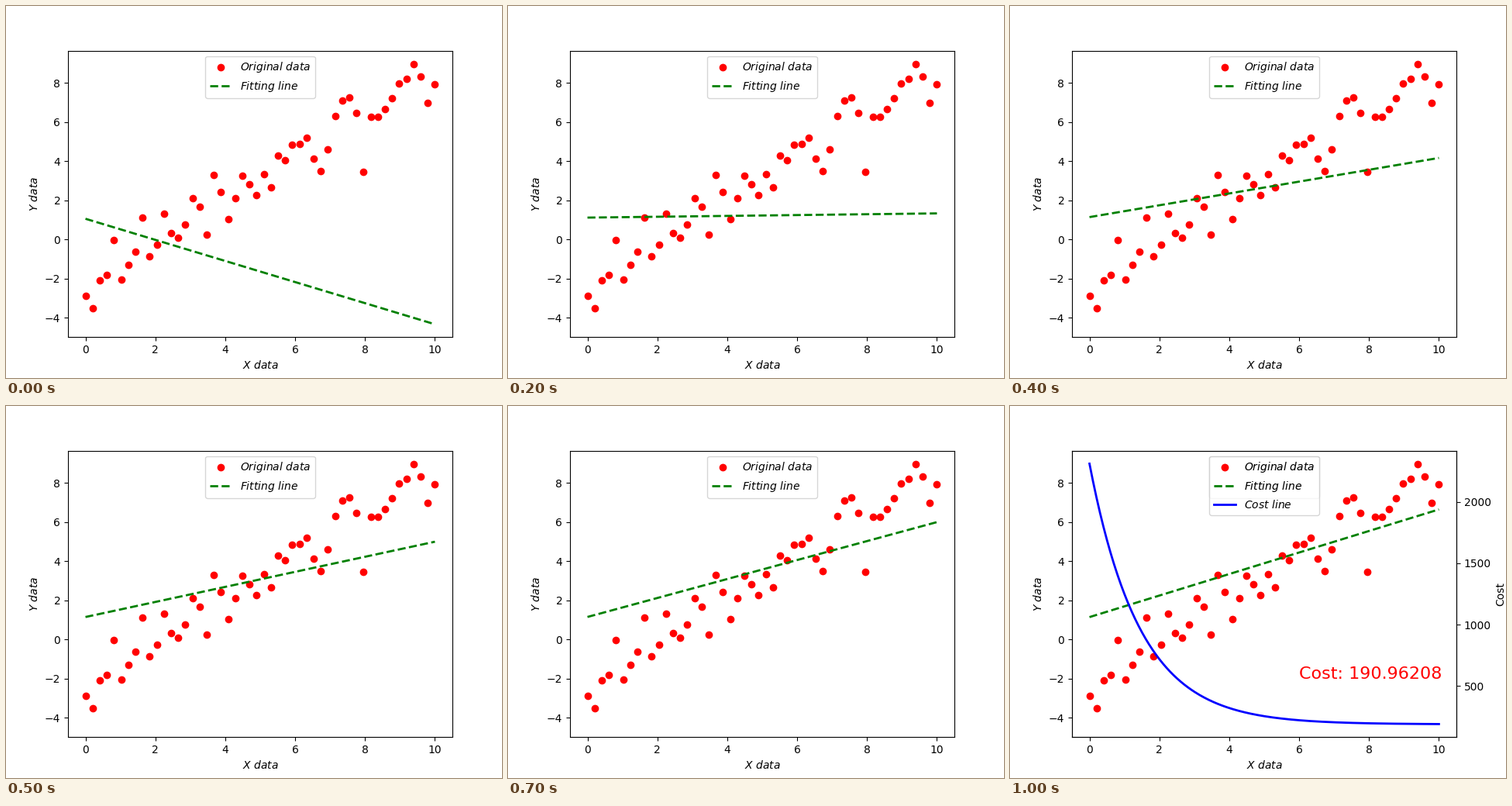
These frames come from a looping animation (640 px wide and 480 px high, 1100 ms). A matplotlib script:

```python
import numpy as np
import matplotlib.pyplot as plt
from matplotlib.animation import FuncAnimation

STEPS = 11
DECAY = 0.5 ** 0.5  # error left after each training step
FINAL_COST = 190.96208

x = np.linspace(0, 10, 50)
y = np.array([
    -2.89, -3.53, -2.09, -1.82, -0.02, -2.04, -1.30, -0.62, 1.13, -0.86,
    -0.27, 1.33, 0.33, 0.09, 0.77, 2.11, 1.68, 0.25, 3.31, 2.43,
    1.05, 2.12, 3.27, 2.83, 2.28, 3.35, 2.67, 4.29, 4.06, 4.86,
    4.89, 5.21, 4.14, 3.50, 4.62, 6.32, 7.11, 7.27, 6.48, 3.46,
    6.28, 6.28, 6.68, 7.20, 7.99, 8.22, 8.98, 8.31, 7.00, 7.92])


def fit_ends(step):
    """Heights of the fitted line at x = 0 and x = 10."""
    left = 1.20 - 0.14 * DECAY ** step - 0.005 * step
    right = 7.0 - 11.33 * DECAY ** step
    return left, right


fig, ax = plt.subplots(figsize=(6.4, 4.8), dpi=100)
dots = ax.scatter(x, y, color='red', label=r'$Original\ data$')
fit, = ax.plot([0, 10], fit_ends(0), 'g--', lw=2, label=r'$Fitting\ line$')
ax.set_xlim(-0.5, 10.5)
ax.set_ylim(-4.985, 9.65)
ax.set_xlabel(r'$X\ data$')
ax.set_ylabel(r'$Y\ data$')
ax.legend(loc='upper center')
note = ax.text(6, -2, f'Cost: {FINAL_COST:.5f}', size=16, color='red')

# Cost history, shown once training is done
cost_ax = ax.twinx()
t = np.linspace(0, 10, 300)
cost = FINAL_COST + 2122 * (DECAY ** (2 * t) - DECAY ** 20)
cost_line, = cost_ax.plot(t, cost, 'b-', lw=2, label=r'$Cost\ line$')
cost_ax.set_xlim(-0.5, 10.5)
cost_ax.set_ylabel('Cost')
cost_ax.legend(handles=[dots, fit, cost_line], loc='upper center')


def update(step):
    fit.set_ydata(fit_ends(step))
    done = step == STEPS - 1
    note.set_visible(done)
    cost_ax.set_visible(done)
    return fit, note, cost_line


anim = FuncAnimation(fig, update, frames=STEPS, interval=100,
                     repeat=True, repeat_delay=0, blit=False)
plt.show()
```
